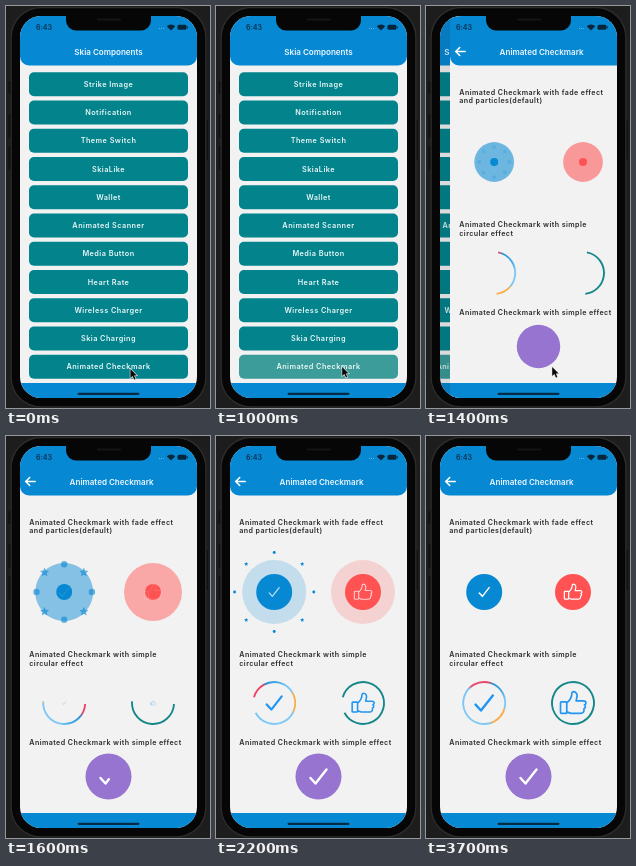
An HTML page with a canvas that plays this animation: 204 px wide and 402 px high, repeating every 3.8 s.

```html
<!DOCTYPE html>
<html>
<head>
<meta charset="utf-8">
<style>
html, body { margin: 0; width: 100%; height: 100%; overflow: hidden; background: #1d1d1d; }
canvas { display: block; width: 204px; height: 402px; }
</style>
</head>
<body>
<canvas id="stage"></canvas>
<script>
const W = 204, H = 402, LOOP = 3800, STEP = 100;
const SCREEN = { x: 14, y: 10, w: 177, h: 382 };
const BLUE = '#0788d3', TEAL = '#03838c', PAGE = '#f2f2f2', RED = '#ff5252';
const FONT = 'Inter, "Noto Sans", sans-serif';
const ITEMS = ['Strike Image', 'Notification', 'Theme Switch', 'SkiaLike', 'Wallet',
  'Animated Scanner', 'Media Button', 'Heart Rate', 'Wireless Charger', 'Skia Charging',
  'Animated Checkmark'];

const canvas = document.getElementById('stage');
const ratio = window.devicePixelRatio || 1;
canvas.width = W * ratio;
canvas.height = H * ratio;
const c = canvas.getContext('2d');

const clamp = v => Math.max(0, Math.min(1, v));
const span = (t, a, b) => clamp((t - a) / (b - a));
const easeOut = (p, n = 2) => 1 - Math.pow(1 - p, n);
const rad = d => d * Math.PI / 180;

function box(x, y, w, h, r, fill) {
  c.beginPath();
  c.roundRect(x, y, w, h, r);
  c.fillStyle = fill;
  c.fill();
}

function disc(x, y, r, fill, alpha = 1) {
  if (r <= 0 || alpha <= 0) return;
  c.save();
  c.globalAlpha *= alpha;
  c.beginPath();
  c.arc(x, y, r, 0, 2 * Math.PI);
  c.fillStyle = fill;
  c.fill();
  c.restore();
}

function label(text, x, y, size, weight, color, align = 'left', spacing = 0) {
  c.font = `${weight} ${size}px ${FONT}`;
  c.letterSpacing = spacing + 'px';
  c.textAlign = align;
  c.fillStyle = color;
  c.fillText(text, x, y);
}

// Strokes an icon drawn around (0, 0); line width stays in stage pixels.
function icon(trace, x, y, scale, color, width, alpha = 1) {
  if (scale <= 0 || alpha <= 0) return;
  c.save();
  c.translate(x, y);
  c.scale(scale, scale);
  c.beginPath();
  trace();
  c.globalAlpha = alpha;
  c.strokeStyle = color;
  c.lineWidth = width / scale;
  c.lineCap = c.lineJoin = 'round';
  c.stroke();
  c.restore();
}

function check(done = 1) {
  const a = clamp(done / 0.35), b = clamp((done - 0.35) / 0.65);
  c.moveTo(-8, 1.5);
  c.lineTo(-8 + 5 * a, 1.5 + 5.5 * a);
  if (b) c.lineTo(-3 + 11 * b, 7 - 14 * b);
}

function thumb() {
  c.roundRect(-12, -1, 6, 11, 0.8);
  c.moveTo(-6, 0);
  c.bezierCurveTo(-2, -3, -1, -6, -1, -10);
  c.bezierCurveTo(1, -12, 4, -10, 4, -7);
  c.lineTo(3, -2);
  c.lineTo(10, -2);
  c.bezierCurveTo(13, -2, 13, 1, 11, 2);
  c.bezierCurveTo(12.5, 3, 12, 5, 10.5, 5.5);
  c.bezierCurveTo(11, 8, 10, 10, 7, 10);
  c.lineTo(-2, 10);
  c.lineTo(-6, 8.5);
}

function star(x, y, r) {
  c.beginPath();
  for (let i = 0; i < 10; i++) {
    const a = rad(i * 36 - 90), d = i % 2 ? r * 0.48 : r;
    c.lineTo(x + d * Math.cos(a), y + d * Math.sin(a));
  }
  c.fillStyle = BLUE;
  c.fill();
}

function particles(x, y, t) {
  const size = span(t, 1250, 1500) * (1 - span(t, 1850, 2500));
  if (!size) return;
  const d = 32 * easeOut(span(t, 1250, 1800)) + 7.6 * easeOut(span(t, 1800, 2200));
  c.save();
  c.globalAlpha = span(t, 1300, 1800);
  for (let i = 0; i < 8; i++) {
    const a = rad(i * 45), px = x + d * Math.cos(a), py = y + d * Math.sin(a);
    if (i % 2) star(px, py, 4.8 * size);
    else disc(px, py, 3.2 * size, BLUE);
  }
  c.restore();
}

function burst(x, y, t, color) {
  const halo = 32 * easeOut(span(t, 1150, 1800));
  disc(x, y, halo, color, clamp(0.65 - 0.00045 * (t - 1200)));
  disc(x, y, 18 * span(t, 1200, 2100), color);
}

// Sweep of colours led by red, with orange swinging ahead of it.
function rainbow(x, y, turn, lead) {
  const g = c.createConicGradient(rad(turn), x, y);
  const stop = (deg, tone) => g.addColorStop(deg / 360, tone);
  const pink = '#ea4468', sky = '#7dc8f5', orange = '#fbaf4c';
  stop(0, pink);
  stop(20, pink);
  stop(32, '#2490d6');
  stop(70, '#4fb0ea');
  stop(90, sky);
  stop(lead - 32, sky);
  stop(lead - 20, orange);
  stop(lead + 20, orange);
  stop(lead + 36, sky);
  stop(320, sky);
  stop(332, pink);
  stop(360, pink);
  return g;
}

function ring(x, y, t, color) {
  const left = Math.max(0, 6.8 + 0.0152 * (2200 - t));
  const turn = 262 - left * left;
  const start = turn - 20 + 62 * (1 - span(t, 1200, 1720));
  const sweep = 163 + 37 * span(t, 1400, 1800) + 160 * span(t, 1800, 2350);
  const lead = 140 + 70 * Math.sin(Math.PI * span(t, 1300, 2200));
  c.beginPath();
  c.arc(x, y, 21, rad(start), rad(start + sweep));
  c.strokeStyle = color || rainbow(x, y, turn, lead);
  c.lineWidth = 1.9;
  c.lineCap = 'butt';
  c.stroke();
}

function page(title, center) {
  const { x, y, w, h } = SCREEN;
  box(x, y, w, h, 0, PAGE);
  box(x, y, w, 49.5, [0, 0, 9, 9], BLUE);
  box(x, 377, w, 16, 0, BLUE);
  label(title, center, 48.5, 8.05, 600, '#e9f6ff', 'center');
}

function listPage(t) {
  page('Skia Components', 102.5);
  ITEMS.forEach((name, i) => {
    const y = 66.2 + i * 28.25;
    const pressed = i === 10 && t >= 900;
    box(23, y, 159, 24, 5, pressed ? '#3b9c99' : TEAL);
    label(name, 102.5, y + 14.6, 7.3, 600, '#e9f7f7', 'center', 0.45);
  });
}

function arrow() {
  c.moveTo(5, 0);
  c.lineTo(-4.5, 0);
  c.moveTo(-0.5, -4);
  c.lineTo(-4.5, 0);
  c.lineTo(-0.5, 4);
}

function detailPage(t) {
  page('Animated Checkmark', 105.6);
  icon(arrow, 24.2, 45.5, 1, '#fff', 1.6);
  const head = (text, y) => label(text, 23.3, y, 7.1, 600, '#2a2a2a', 'left', 0.42);
  head('Animated Checkmark with fade effect', 88.5);
  head('and particles(default)', 97);
  head('Animated Checkmark with simple', 221);
  head('circular effect', 229.5);
  head('Animated Checkmark with simple effect', 308.5);

  const tone = span(t, 1450, 2500);
  burst(58.2, 156, t, BLUE);
  particles(58.2, 156, t);
  icon(check, 58.2, 156, 0.62, '#fff', 0.8 + 0.7 * tone, tone);
  burst(147, 156, t, RED);
  icon(thumb, 147, 156, 0.72, '#fff', 0.9 + 0.3 * tone, tone);

  const pop = easeOut(span(t, 1450, 2400), 1.3), shown = span(t, 1450, 2150);
  ring(58.2, 267, t);
  icon(check, 58.2, 267, 1.08 * pop, '#2196f3', 0.8 + 1.6 * pop, shown);
  ring(147, 267, t, '#168789');
  icon(thumb, 147, 267, 1.04 * pop, '#2196f3', 0.8 + 0.9 * pop, shown);

  disc(102.5, 340.5, 23 * easeOut(span(t, 1140, 1480)), '#9674cf');
  const drawn = span(t, 1420, 1750);
  if (drawn) icon(() => check(drawn), 102.5, 340.5, 1, '#fff', 2.4);
}

function statusBar() {
  label('6:43', 30, 24, 7.1, 600, '#0b3350');
  for (let i = 0; i < 3; i++) disc(153.5 + i * 2, 22.5, 0.55, '#6fb6e2');
  c.beginPath();
  c.moveTo(165, 24.5);
  c.arc(165, 24.5, 6, rad(-135), rad(-45));
  c.fillStyle = '#06263b';
  c.fill();
  box(171.5, 18.8, 9, 5, 1.5, '#06263b');
  box(181, 20.3, 0.9, 2, 0.4, '#06263b');
  box(71.5, 386.7, 62, 2.2, 1.1, '#062c45');
}

function phone() {
  box(0, 0, W, H, 0, '#1d1d1d');
  [[75, 13], [108, 24], [140, 24]].forEach(([y, h]) => box(2.5, y, 4, h, 1, '#111'));
  box(198, 114, 4, 40, 1, '#111');
  box(4.5, 1, 196, 400.5, 30, '#2d2d2d');
  box(5.8, 2.3, 193.4, 398, 29, '#060606');
}

function cursor(t) {
  if (t >= 1600) return;
  const p = easeOut(span(t, 100, 600));
  c.save();
  c.translate(124.4 + 1.8 * p, 363 - 2 * p);
  c.beginPath();
  [[0, 0], [0, 9], [2.1, 7.1], [3.8, 10.6], [5.2, 9.9], [3.6, 6.6], [6.4, 6.4]]
    .forEach(([x, y]) => c.lineTo(x, y));
  c.closePath();
  c.lineWidth = 1.2;
  c.strokeStyle = '#e8e8e8';
  c.stroke();
  c.fillStyle = '#0a0a0a';
  c.fill();
  c.restore();
}

function draw(t) {
  c.setTransform(ratio, 0, 0, ratio, 0, 0);
  phone();

  const s = Math.max(0, t - 1136) * 0.0172;
  const push = t > 1500 ? 1 : 1 - (1 + s) * Math.exp(-s);
  const { x, y, w, h } = SCREEN;
  c.save();
  c.beginPath();
  c.roundRect(x, y, w, h, 21);
  c.clip();
  if (push < 1) {
    c.save();
    c.translate(-0.3 * w * push, 0);
    listPage(t);
    c.restore();
    box(x, y, w, h, 0, `rgba(0,0,0,${0.1 * push})`);
  }
  if (push > 0) {
    c.save();
    c.translate(Math.round(w * (1 - push)), 0);
    detailPage(t);
    c.restore();
  }
  statusBar();
  c.restore();

  box(60, 5, 85, 19.5, [0, 0, 10, 10], '#060606');
  box(91, 12.5, 24, 2, 1, '#151515');
  cursor(t);
}

const began = performance.now();
function tick() {
  const t = (performance.now() - began) % LOOP;
  draw(Math.floor(t / STEP) * STEP);
  requestAnimationFrame(tick);
}
tick();
</script>
</body>
</html>
```
